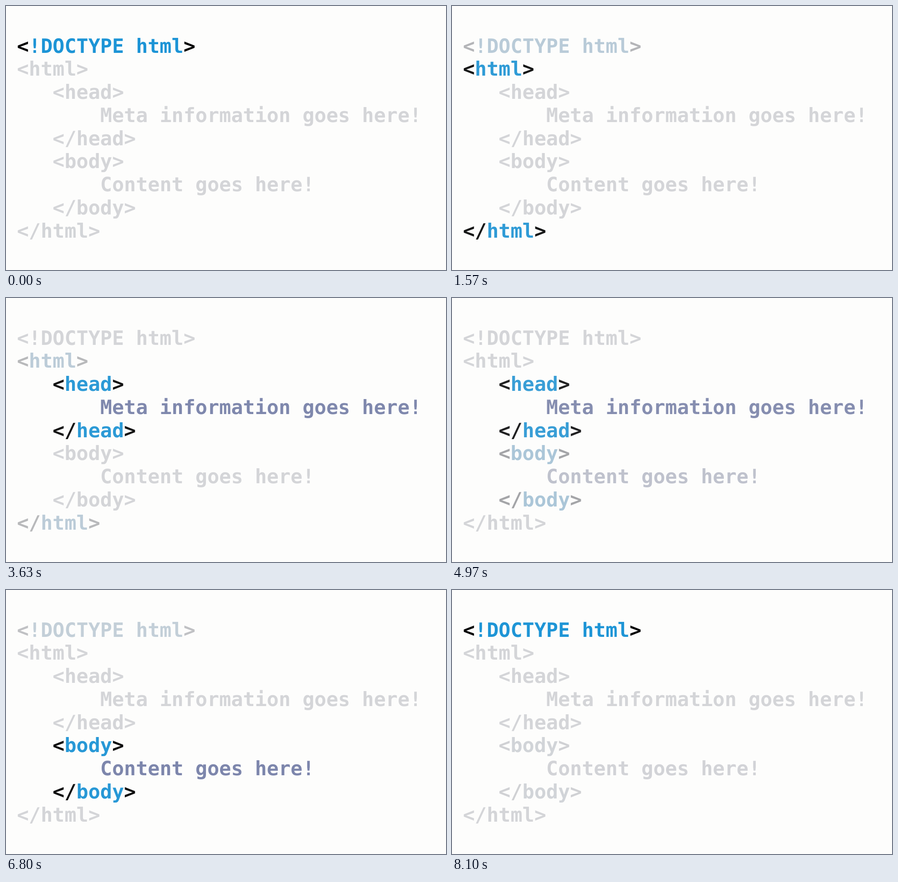
These frames come from a looping animation (966 by 580 pixels, 8.13 s). An HTML page:

```html
<!DOCTYPE html>
<html lang="en">
<head>
<meta charset="utf-8">
<title>HTML skeleton</title>
<style>
  html, body { margin: 0; width: 100%; height: 100%; overflow: hidden; background: #fdfdfc; }
  svg { display: block; width: 966px; height: 580px; }
  text {
    font: bold 43.4px "DejaVu Sans Mono", monospace;
    text-rendering: geometricPrecision;
    white-space: pre;
  }
</style>
</head>
<body>
<svg id="stage" viewBox="0 0 966 580"></svg>
<script>
const LOOP = 8130;
const GROUPS = 4;
const STEP = LOOP / GROUPS;
const LEFT = 23.9, ADVANCE = 26.13;
const BASELINE = 102.5, LINE_HEIGHT = 50.75;

const IDLE = [212, 213, 216];
const COLORS = {
  bracket: [0, 0, 0],
  tag: [28, 148, 214],
  copy: [119, 129, 169]
};

// Each line: group, indent in columns, then [kind, text] runs.
const tag = (group, indent, open, name) =>
  [group, indent, ["bracket", open], ["tag", name], ["bracket", ">"]];
const copy = (group, indent, words) => [group, indent, ["copy", words]];

const LINES = [
  tag(0, 0, "<", "!DOCTYPE html"),
  tag(1, 0, "<", "html"),
  tag(2, 3, "<", "head"),
  copy(2, 7, "Meta information goes here!"),
  tag(2, 3, "</", "head"),
  tag(3, 3, "<", "body"),
  copy(3, 7, "Content goes here!"),
  tag(3, 3, "</", "body"),
  tag(1, 0, "</", "html")
];

const stage = document.getElementById("stage");
const runs = [];

LINES.forEach(([group, indent, ...parts], row) => {
  let column = indent;
  for (const [kind, words] of parts) {
    const node = document.createElementNS("http://www.w3.org/2000/svg", "text");
    node.setAttribute("x", LEFT + column * ADVANCE);
    node.setAttribute("y", BASELINE + row * LINE_HEIGHT);
    node.textContent = words;
    stage.appendChild(node);
    runs.push({ node, group, kind });
    column += words.length;
  }
});

const progress = ms => 1 / (1 + Math.exp((1190 - ms) * 0.0051));
const strength = p => p + 0.22 * p * (1 - p);
const mix = (from, to, k) =>
  `rgb(${from.map((v, i) => Math.round(v + (to[i] - v) * k)).join(",")})`;

function render(time) {
  const t = time % LOOP;
  const current = Math.floor(t / STEP) % GROUPS;
  const p = progress(t - current * STEP);
  const levels = new Array(GROUPS).fill(0);
  levels[current] = strength(1 - p);
  levels[(current + 1) % GROUPS] = strength(p);
  for (const { node, group, kind } of runs) {
    node.setAttribute("fill", mix(IDLE, COLORS[kind], levels[group]));
  }
}

const start = performance.now();
function tick() {
  render(performance.now() - start);
  requestAnimationFrame(tick);
}
tick();
</script>
</body>
</html>
```
